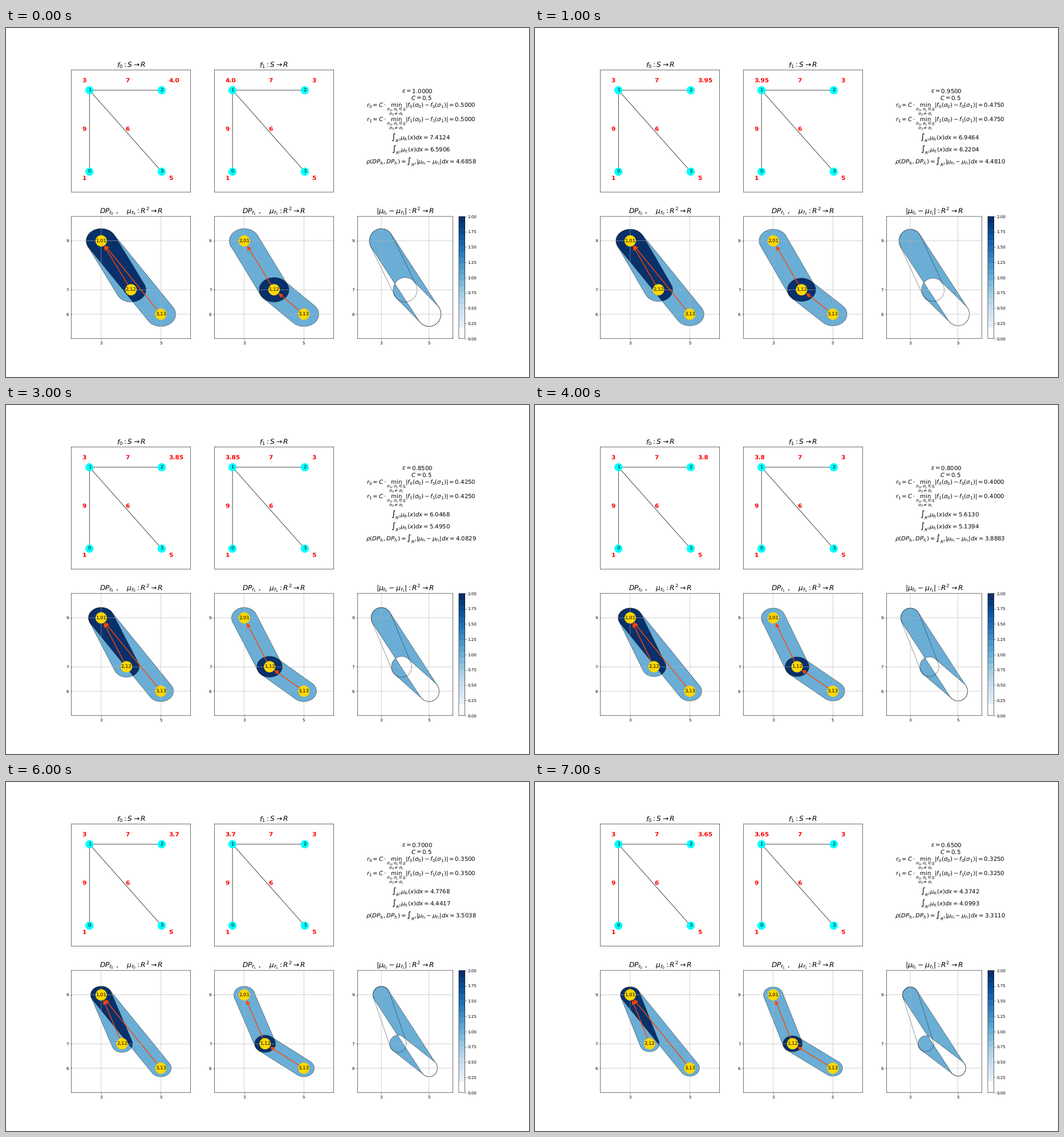
A matplotlib script that plays this animation: 917 by 611 pixels, repeating every 8000 ms.

```python
import numpy as np
import matplotlib.pyplot as plt
from matplotlib.animation import FuncAnimation
from matplotlib.cm import ScalarMappable
from matplotlib.colors import ListedColormap, Normalize
from matplotlib.patches import Ellipse, FancyArrowPatch, PathPatch
from matplotlib.path import Path

W, H, DPI = 917, 611, 50.944
FRAMES = 8
C = 0.5
NODE, VERTEX = 28, 20.2  # diameters in points

# soft subpixel lines and letters
plt.rcParams.update({"path.snap": False, "text.hinting": "none"})

blues = plt.get_cmap("Blues")
ONE, TWO = blues(0.5), blues(1.0)

# the tiny margin keeps the canvas from being rounded down
fig, axes = plt.subplots(2, 3, dpi=DPI,
                         figsize=((W + 1e-3) / DPI, (H + 1e-3) / DPI))
graph0, graph1, notes = axes[0]
plot0, plot1, plot_diff = axes[1]
notes.axis("off")
live = []


def disc(ax, xy, size, color):
    """Round dot of a size in points, placed in data units."""
    unit = np.diff(ax.transData.transform([(0, 0), (1, 1)]), axis=0)[0]
    w, h = size * DPI / 72 / unit
    return ax.add_patch(Ellipse(xy, w, h, fc=color, ec="none", zorder=2))


def label(ax, x, y, s):
    return ax.text(x, y, s, size=12, ha="center", va="center")


def value(ax, x, y, s):
    return ax.text(x, y, s, size=15, color="red", weight="bold")


def setup_graph(ax, title):
    pos = np.array([(0, 0), (0, 1), (1, 1), (1, 0)])
    ax.set(xlim=(-0.25, 1.4), ylim=(-0.25, 1.25), xticks=[], yticks=[])
    ax.set_title(title, fontsize="xx-large")
    for end in (0, 2, 3):
        ax.plot(*pos[[1, end]].T, color="black", lw=1, zorder=1)
    for k, (x, y) in enumerate(pos):
        disc(ax, (x, y), VERTEX, "cyan")
        label(ax, x, y, str(k))
    for x, y, s in [(-0.1, -0.1, "1"), (1.1, -0.1, "5"), (-0.1, 0.5, "9"),
                    (0.5, 0.5, "6"), (0.5, 1.1, "7")]:
        value(ax, x, y, s)


def setup_plot(ax, title):
    ax.set(xlim=(2, 6), ylim=(5, 10), xticks=[3, 5], yticks=[6, 7, 9])
    ax.set_title(title, fontsize="xx-large")
    ax.grid(True)


def capsule(a, b, r):
    """Closed outline, clockwise, of all points within r of segment ab."""
    a, b = np.array(a), np.array(b)
    ang = np.arctan2(*(b - a)[::-1])
    turn = np.linspace(np.pi / 2, -np.pi / 2, 65)

    def cap(c, base):
        return c + r * np.column_stack([np.cos(base + turn), np.sin(base + turn)])

    pts = np.vstack([cap(b, ang), cap(a, ang + np.pi)])
    return Path(np.vstack([pts, pts[:1]]), closed=True)


def fill(ax, path, color, clip=None):
    patch = ax.add_patch(PathPatch(path, fc=color, ec="none"))
    if clip is not None:
        patch.set_clip_path(clip, ax.transData)
    live.append(patch)


def outline(ax, path):
    live.append(ax.add_patch(PathPatch(path, fill=False, ec="black", lw=1.5, ls=":")))


def draw_pairs(ax, first, second, arrows, points, names):
    fill(ax, first, ONE)
    fill(ax, second, ONE)
    fill(ax, second, TWO, clip=first)
    outline(ax, first)
    outline(ax, second)
    for a, b in arrows:
        arrow = FancyArrowPatch(a, b, arrowstyle="-|>", mutation_scale=20, lw=2,
                                color="orangered", shrinkA=NODE / 2, shrinkB=NODE / 2)
        live.append(ax.add_patch(arrow))
    for xy, s in zip(points, names):
        live.append(disc(ax, xy, NODE, "gold"))
        live.append(label(ax, *xy, s))


def area(a, b, r):
    return 2 * r * np.hypot(b[0] - a[0], b[1] - a[1]) + np.pi * r * r


def span(y, a, b, r):
    """Left and right end of the capsule at each height y."""
    dx, dy = b[0] - a[0], b[1] - a[1]
    ny = -dx / np.hypot(dx, dy) * np.sign(dy)
    ends = []
    for side in (-1, 1):
        t = np.clip((y - side * r * ny - a[1]) / dy, 0, 1)
        half = r * r - (y - a[1] - t * dy) ** 2
        x = a[0] + t * dx + side * np.sqrt(np.maximum(half, 0))
        ends.append(np.where(half > 0, x, -side * 99))
    return ends


def overlap(s1, s2, r):
    n = 40000
    y = 5 + (np.arange(n) + 0.5) * 5 / n
    l1, r1 = span(y, *s1, r)
    l2, r2 = span(y, *s2, r)
    return np.maximum(np.minimum(r1, r2) - np.maximum(l1, l2), 0).sum() * 5 / n


def note(x, y, s):
    live.append(fig.text(x / W, 1 - y / H, s, size="x-large",
                         ha="center", va="baseline"))


def radius_line(k, r):
    under = (r"\underset{\sigma_0\neq\sigma_1}"
             r"{\underset{\sigma_0,\sigma_1\in S}{\min}}")
    return (rf"$r_{k}=C\cdot {under}"
            rf"|f_{k}(\sigma_0)-f_{k}(\sigma_1)|={r:.4f}$")


def update(i):
    while live:
        live.pop().remove()
    eps = round(1 - 0.05 * i, 2)
    r = C * eps
    top, mid, low = (3.0, 9.0), (3 + eps, 7.0), (5.0, 6.0)
    short, long, link = (mid, top), (low, top), (low, mid)
    cap_short, cap_long, cap_link = (capsule(*s, r) for s in (short, long, link))

    moving = str(round(3 + eps, 2))
    for ax, left, right in [(graph0, "3", moving), (graph1, moving, "3")]:
        live.append(value(ax, -0.1, 1.1, left))
        live.append(value(ax, 1.1, 1.1, right))

    points = (top, mid, low)
    draw_pairs(plot0, cap_short, cap_long, (short, long), points,
               ("1,01", "2,12", "3,13"))
    draw_pairs(plot1, cap_short, cap_link, (short, link), points,
               ("2,01", "1,12", "3,13"))

    # opposite windings cancel where the two capsules overlap
    back = Path(cap_link.vertices[::-1], closed=True)
    fill(plot_diff, Path.make_compound_path(cap_long, back), ONE)
    for path in (cap_short, cap_long, cap_link):
        outline(plot_diff, path)

    total0 = area(*short, r) + area(*long, r)
    total1 = area(*long, r) + area(*link, r)
    rho = total1 - overlap(long, link, r)
    note(721, 114.3, rf"$\epsilon={eps:.4f}$")
    note(728, 125.6, rf"$C={C}$")
    note(727.5, 137.8, radius_line(0, r))
    note(727.5, 163.5, radius_line(1, r))
    note(727.5, 194.5, rf"$\int_{{R^2}}\mu_{{f_0}}(x)dx={total0:.4f}$")
    note(727.5, 215.5, rf"$\int_{{R^2}}\mu_{{f_1}}(x)dx={total1:.4f}$")
    note(727.5, 236.5, r"$\rho(DP_{f_0},DP_{f_1})="
         rf"\int_{{R^2}}|\mu_{{f_0}}-\mu_{{f_1}}|dx={rho:.4f}$")
    return live


setup_graph(graph0, r"$f_0:S\rightarrow R$")
setup_graph(graph1, r"$f_1:S\rightarrow R$")
setup_plot(plot0, r"$DP_{f_0}$ ,    $\mu_{f_0}:R^2\rightarrow R$")
setup_plot(plot1, r"$DP_{f_1}$ ,    $\mu_{f_1}:R^2\rightarrow R$")
setup_plot(plot_diff, r"$|\mu_{f_0}-\mu_{f_1}|:R^2\rightarrow R$")

bands = blues(np.linspace(0, 1, 21))
bands[:2] = 1
scale = ScalarMappable(Normalize(0, 2), ListedColormap(bands))
fig.colorbar(scale, ax=plot_diff, ticks=np.arange(0, 2.1, 0.25), format="%.2f")

anim = FuncAnimation(fig, update, frames=FRAMES, interval=1000,
                     init_func=lambda: [], repeat=True, blit=False)
plt.show()
```
